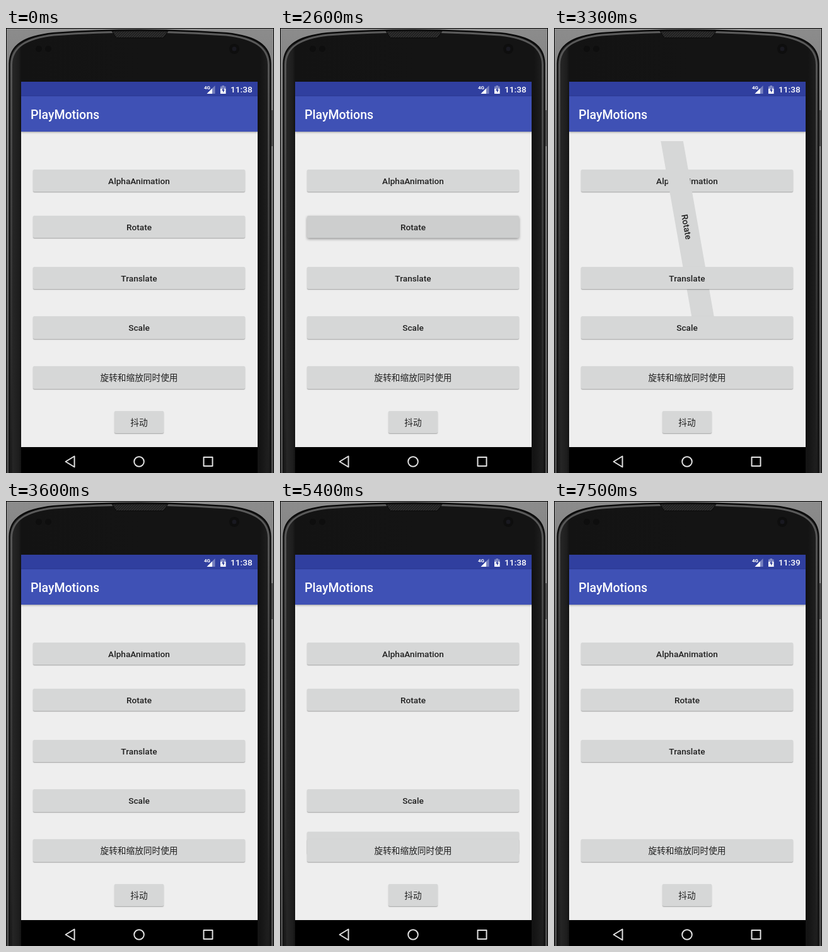
Animation of 425 by 704 pixels, one loop 8 s. Source, as an HTML page:

```html
<!DOCTYPE html>
<html lang="en">
<head>
<meta charset="utf-8">
<title>Animation demo</title>
<style>
  html, body { margin: 0; width: 100%; height: 100%; overflow: hidden; background: #000; }
  #stage { position: relative; width: 425px; height: 704px; overflow: hidden;
    font: 500 13.67px Roboto, "Noto Sans CJK SC", sans-serif; }
  svg { position: absolute; left: 0; top: 0; }
  .screen { position: absolute; left: 24px; top: 85px; width: 375px; height: 619px; background: #eee; }
  .status { height: 23px; background: #303f9f; }
  .bar { height: 56px; background: #3f51b5; box-shadow: 0 1px 3px rgba(0, 0, 0, .35);
    color: #fff; font-size: 19.53px; line-height: 60px; text-indent: 15px; }
  .nav { position: absolute; bottom: 0; width: 100%; height: 41px; background: #000; }
  #clock { position: absolute; left: 356px; top: 89px; color: #fff; line-height: 16px; }
  /* the padded layout clips its children */
  .layout { position: absolute; inset: 0; clip-path: inset(179px 41.6px 41px 39.6px); }
  .btn { position: absolute; left: 43px; width: 336px; height: 35px; line-height: 36px;
    text-align: center; white-space: nowrap; color: #212121; background: #d6d7d7;
    border-radius: 2px; box-shadow: 0 1px 1.5px rgba(0, 0, 0, .32); }
  .btn.pressed { background: #cdcece; box-shadow: 0 2px 4px rgba(0, 0, 0, .36); }
  .btn.flat { box-shadow: none; }
  .cjk { line-height: 34px; font-weight: 400;
    font-family: "Noto Sans CJK SC", "Noto Sans CJK", sans-serif; }
  #alpha { top: 224px; }
  #rotate { top: 297px; }
  #translate { top: 378px; }
  #scale { top: 456px; height: 36px; }
  #both { top: 535px; height: 36px; }
  #shake { top: 606px; left: 172px; width: 78px; }
</style>
</head>
<body>
<div id="stage">
  <svg width="425" height="704" viewBox="0 0 425 704">
    <defs>
      <linearGradient id="back" x1="0" y1="0" x2="0" y2="1">
        <stop offset="0" stop-color="#8c8c8c"/><stop offset=".35" stop-color="#6f6f6f"/>
        <stop offset="1" stop-color="#484848"/>
      </linearGradient>
      <linearGradient id="body">
        <stop offset="0" stop-color="#2a2a2a"/><stop offset=".035" stop-color="#1e1e1e"/>
        <stop offset=".045" stop-color="#131313"/><stop offset=".5" stop-color="#141414"/>
        <stop offset=".96" stop-color="#141414"/><stop offset="1" stop-color="#222"/>
      </linearGradient>
      <linearGradient id="rim" gradientUnits="userSpaceOnUse" x1="0" y1="0" x2="0" y2="704">
        <stop offset="0" stop-color="#5c5c5c"/><stop offset=".3" stop-color="#444"/>
        <stop offset="1" stop-color="#1c1c1c"/>
      </linearGradient>
      <pattern id="mesh" width="4" height="4" patternUnits="userSpaceOnUse">
        <rect width="4" height="4" fill="#2d2d2d"/>
        <path d="M0 4L4 0" stroke="#151515"/>
      </pattern>
    </defs>
    <rect width="425" height="704" fill="url(#back)"/>
    <path d="M0 .5H425M.5 0V704M424.5 0V704" stroke="#000"/>
    <rect x="421" y="130" width="2" height="57" fill="#3a3a3a"/>
    <path d="M5.5 710V56C6 27 28 13 75 8Q212 -2 350 8C397 13 419 27 419.5 56V710Z"
      fill="url(#body)" stroke="#0a0a0a" stroke-width="2"/>
    <path d="M8.5 710V58C9 30 32 16 76 11Q212 1 349 11C393 16 416 30 416.5 58V710"
      fill="none" stroke="url(#rim)" stroke-width="3"/>
    <path d="M168 5H257L250 15.5H175Z" fill="url(#mesh)" stroke="#0b0b0b"/>
    <g fill="#0e0e0e">
      <circle cx="52" cy="33" r="5"/><circle cx="67" cy="33" r="5"/><circle cx="362" cy="33" r="8"/>
    </g>
    <circle cx="362" cy="33" r="3.5" fill="#191920"/>
  </svg>

  <div class="screen">
    <div class="status"></div>
    <div class="bar">PlayMotions</div>
    <div class="nav"></div>
  </div>

  <svg width="425" height="704" viewBox="0 0 425 704">
    <text x="314" y="97" fill="#fff" font-size="8" font-weight="700" font-family="Roboto, sans-serif">4G</text>
    <path d="M331.5 91V104H318.5Z" fill="#fff" fill-opacity=".35"/>
    <path d="M327 95.5V104H318.5Z" fill="#fff"/>
    <path d="M342.5 91H346V92.5H348.5V104H340V92.5H342.5Z" fill="#fff" fill-opacity=".4"/>
    <path d="M340 96H348.5V104H340Z" fill="#fff"/>
    <path d="M345.2 94L342 99H344V102.5L347 97.5H345.2Z" fill="#303f9f"/>
    <g fill="none" stroke="#e2e2e2" stroke-width="2" stroke-linejoin="round">
      <path d="M94.5 686L108.5 677.5V694.5Z"/>
      <circle cx="211" cy="686" r="7.8"/>
      <rect x="313.5" y="679" width="14" height="14"/>
    </g>
  </svg>
  <div id="clock">11:38</div>

  <div class="layout">
    <div class="btn" id="alpha">AlphaAnimation</div>
    <div class="btn" id="rotate">Rotate</div>
    <div class="btn" id="translate">Translate</div>
    <div class="btn" id="scale">Scale</div>
    <div class="btn cjk" id="both">旋转和缩放同时使用</div>
    <div class="btn cjk" id="shake">抖动</div>
  </div>
</div>
<script>
  const LOOP = 8000, STEP = 100;
  const $ = id => document.getElementById(id);
  const alpha = $('alpha'), rotate = $('rotate'), translate = $('translate'), scale = $('scale');
  const clock = $('clock');

  // accelerate, then decelerate
  const ease = p => (1 - Math.cos(Math.PI * p)) / 2;
  const progress = (t, start, length = 1000) =>
    ease(Math.min(1, Math.max(0, (t - start) / length)));
  const press = (el, t, at) => el.classList.toggle('pressed', t >= at && t < at + 2 * STEP);

  function draw(t) {
    // the touch highlight fades while the button returns
    const seen = t < 990 ? 1 : progress(t, 990);
    alpha.style.opacity = seen;
    alpha.style.background = `color-mix(in srgb, #aeafaf ${100 * (1 - seen)}%, #d6d7d7)`;

    const turn = progress(t, 2640, 960);
    rotate.style.transform = `rotate(${-360 * turn}deg)`;
    rotate.classList.toggle('flat', turn > 0 && turn < 1);
    press(rotate, t, 2600);

    const drop = t < 5488 ? 148 * progress(t, 4488) : 0;
    translate.style.transform = `translateY(${drop}px)`;
    press(translate, t, 4500);

    scale.style.transform = `scale(${1 - progress(t, 6490)})`;
    press(scale, t, 6500);

    clock.textContent = t < 5800 ? '11:38' : '11:39';
  }

  function tick() {
    const t = performance.now() % LOOP;
    draw(Math.floor(t / STEP) * STEP);
    requestAnimationFrame(tick);
  }
  tick();
</script>
</body>
</html>
```
